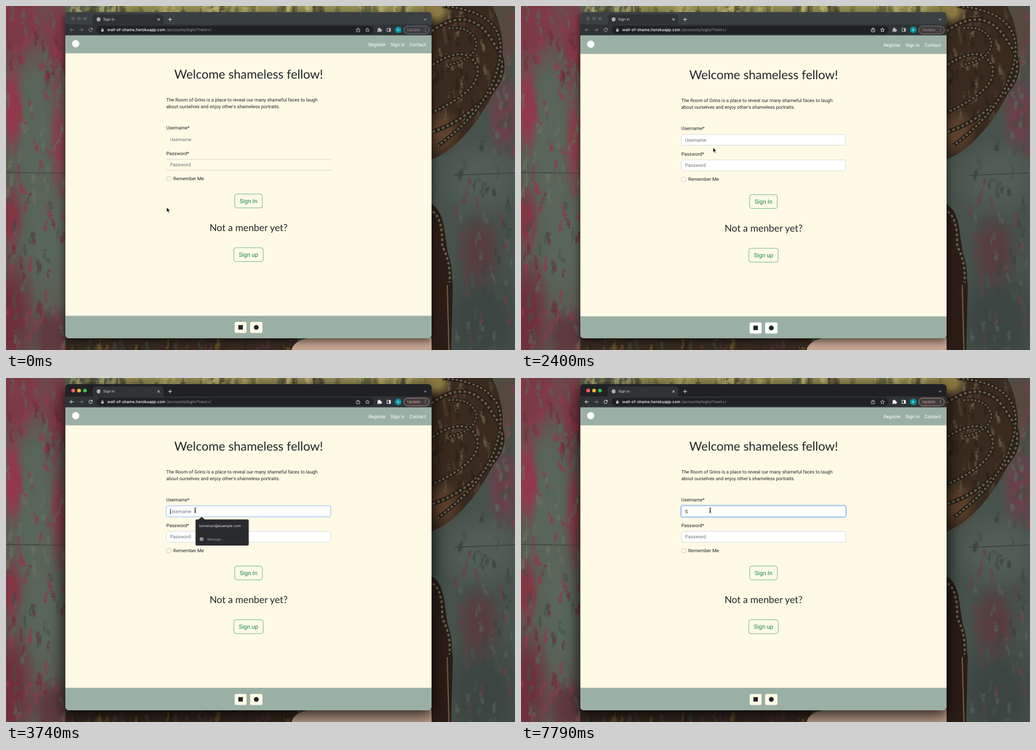
Write an HTML page with a canvas that moves like this. It is 909x616 px and loops after 8000 ms.

```html
<!DOCTYPE html>
<html lang="en">
<head>
<meta charset="utf-8">
<title>Sign in</title>
<style>
html, body { margin: 0; width: 100%; height: 100%; overflow: hidden; background: #4a534b; }
#wall, svg { position: absolute; left: 0; top: 0; }
#shade { position: absolute; left: 106px; top: 11px; width: 654px; height: 584px; border-radius: 6px; }
text { font: 8.41px Roboto, sans-serif; fill: #212529; text-rendering: geometricPrecision; white-space: pre; }
.title { font-family: Lato, sans-serif; text-anchor: middle; }
.btn { font-size: 10.52px; fill: #198754; text-anchor: middle; }
.nav { fill: #fff; }
.hint { fill: #6c757d; }
.ui { font-family: Inter, sans-serif; font-size: 6.4px; fill: #e8eaed; }
.line { fill: none; stroke-linecap: round; stroke-linejoin: round; }
</style>
</head>
<body>
<canvas id="wall" width="909" height="616"></canvas>
<div id="shade"></div>
<svg width="909" height="616" viewBox="0 0 909 616">
  <clipPath id="frame"><rect x="106" y="11" width="654" height="584" rx="6"/></clipPath>
  <g clip-path="url(#frame)">
    <rect id="strip" x="106" y="11" width="654" height="42"/>
    <path d="M151 34q4 0 4-4V20q0-5 5-5H276q5 0 5 5V30q0 4 4 4Z" fill="#2f3335"/>
    <rect x="106" y="33" width="654" height="20" fill="#2f3335"/>
    <rect x="162" y="35.5" width="494" height="14.5" rx="7.2" fill="#202124"/>
    <g id="lights"><circle cx="120" cy="22.5" r="3.3"/><circle cx="130.5" cy="22.5" r="3.3"/><circle cx="141" cy="22.5" r="3.3"/></g>

    <circle cx="165.5" cy="24" r="3.4" fill="#dadce0"/>
    <path class="line" d="M163 22.6l2 .6l.4 1.6l-1.4 1M166.5 21.4l.3 1.4l1.5.4M166.6 26.6l.5-1.6l1.4-.2" stroke="#45484c" stroke-width=".8"/>
    <text class="ui" x="173.8" y="26.3" style="font-size:6.3px">Sign in</text>
    <path class="line" d="M270.7 22.4l3.6 3.6m0-3.6l-3.6 3.6M290 24.2h6m-3-3v6M746.6 23.2l2 2l2-2" stroke="#e8eaed"/>

    <path id="back" class="line" d="M120.5 42.7h-6m2.7-2.7l-2.7 2.7l2.7 2.7"/>
    <path class="line" d="M131.5 42.7h6m-2.7-2.7l2.7 2.7l-2.7 2.7" stroke="#85888c"/>
    <path id="reload" class="line" d="M153.6 40.8a3 3 0 1 0 .5 2.6M154.1 39.5v2h-2"/>
    <rect x="170" y="42" width="4.4" height="3.7" rx=".6" fill="#bdc1c6"/>
    <path class="line" d="M171 42v-1a1.2 1.2 0 0 1 2.4 0v1" stroke="#bdc1c6" stroke-width=".8"/>
    <text class="ui" x="180.8" y="45.4" style="font-size:7.05px"><tspan fill="#fff" font-weight="500">wall-of-shame.herokuapp.com</tspan><tspan x="286.8" fill="#9aa0a6">/accounts/login/?next=/</tspan></text>
    <g id="tools" class="line" stroke-width=".9">
      <path d="M627 41.5h-1.3v4.7h6v-4.7h-1.3M628.7 44v-4.7m-1.6 1.5l1.6-1.6l1.6 1.6"/>
      <path d="M645.5 39.3l1 2.4l2.5.2l-1.9 1.7l.6 2.5l-2.2-1.4l-2.2 1.4l.6-2.5l-1.9-1.7l2.5-.2Z"/>
    </g>
    <g id="apps">
      <path d="M663.3 40.5h2a1.3 1.3 0 1 1 2.5 0h2v2.1a1.3 1.3 0 1 1 0 2.4v1.6h-2.1a1.1 1.1 0 0 0-2.2 0h-2.2v-2a1.2 1.2 0 0 0 0-2.3Z"/>
      <path d="M680 39.5h7.2v6.6H680ZM681 40.5v4.6h3v-4.6Z" fill-rule="evenodd"/>
    </g>
    <circle cx="700.5" cy="42.7" r="5.8" fill="#0097a7"/>
    <text class="ui" x="700.5" y="44.8" text-anchor="middle" style="font-size:5.8px">B</text>
    <g id="update">
      <rect x="710.5" y="36" width="45.5" height="13.8" rx="6.9" fill="#3d3b3e" stroke="currentColor" stroke-width=".8"/>
      <text class="ui" x="716.4" y="45.2" style="font-size:6.85px;fill:currentColor">Update</text>
      <path class="line" d="M749 40.2v0m0 2.6v0m0 2.6v0" stroke="currentColor" stroke-width="1.5"/>
    </g>

    <rect x="106" y="52.5" width="654" height="32" fill="#9bb0a5"/>
    <g id="page">
      <rect x="106" y="53" width="654" height="31.6" fill="#9bb0a5"/>
      <rect x="106" y="84.6" width="654" height="471" fill="#fefae6"/>
      <rect x="106" y="554.7" width="654" height="42" fill="#9bb0a5"/>
      <circle cx="124.5" cy="67.5" r="6.5" fill="#fff"/>
      <text class="nav" x="647.4" y="72">Register</text>
      <text class="nav" x="686.7" y="72">Sign in</text>
      <text class="nav" x="720.5" y="72">Contact</text>
      <text class="title" x="433.4" y="130.3" style="font-size:22.05px">Welcome shameless fellow!</text>
      <text x="286.2" y="170.5">The Room of Grins is a place to reveal our many shameful faces to laugh</text>
      <text x="286.2" y="183.2">about ourselves and enjoy other's shameless portraits.</text>
      <text x="286.2" y="221">Username*</text>
      <text x="286.2" y="266.8">Password*</text>
      <path id="faint" class="line" d="M286.5 231v-1M286.5 246v1M579.5 231v-1M579.5 246v1M288 274.6H578.5l1 1M286.5 275.6l1.5-1M288 294.2H578.5l1-1M286.5 293.2l1.5 1" stroke="#cfd1cc" stroke-width=".8"/>
      <g id="fields" fill="#fff" stroke="#ced4da" stroke-width=".8">
        <rect id="ring" x="285.2" y="228" width="295.6" height="21.4" rx="4" fill="none" stroke="#0d6efd" stroke-opacity=".3" stroke-width="2.2"/>
        <rect id="user" x="286.4" y="229" width="293.4" height="19.4" rx="3"/>
        <rect x="286.4" y="274.6" width="293.4" height="19.4" rx="3"/>
      </g>
      <text id="name" class="hint" x="292.9" y="241.7">Username</text>
      <text class="hint" x="292.9" y="287.3">Password</text>
      <rect id="caret" y="234" width=".9" height="10" fill="#212529"/>
      <rect id="check" x="286.8" y="305.4" width="7.6" height="7.6" rx="2" stroke="#b4b7b6" stroke-width=".7"/>
      <text x="298.8" y="312.3">Remember Me</text>
      <g fill="none" stroke="#198754" stroke-width=".6">
        <rect x="408.4" y="336.8" width="49.4" height="24.8" rx="3.8"/>
        <rect x="406.9" y="432.9" width="52.4" height="24.8" rx="3.8"/>
      </g>
      <text class="btn" x="433.1" y="353">Sign In</text>
      <text class="btn" x="433.1" y="449.1">Sign up</text>
      <text class="title" x="433.2" y="402.8" style="font-size:17.3px">Not a menber yet?</text>
      <g id="tiles"><rect x="408.4" y="565.7" width="21.2" height="19.7" rx="2.6"/><rect x="436" y="565.7" width="22" height="19.7" rx="2.6"/></g>
      <rect x="415" y="571.4" width="8" height="8" fill="#212529"/>
      <circle cx="447" cy="575.5" r="4.3" fill="#212529"/>
    </g>

    <g id="menu">
      <path d="M340.5 253.3H344l5.5-4.6l5.5 4.6H431.5q2 0 2 2V298q0 2-2 2H340.5q-2 0-2-2V255.3q0-2 2-2Z" fill="#292a2d"/>
      <text class="ui" x="345" y="267.3">tomelvari@example.com</text>
      <circle cx="349.2" cy="288.6" r="3.5" fill="#8b8e92"/>
      <text class="ui" x="359.6" y="291" style="fill:#9aa0a6">Manage...</text>
    </g>
  </g>
  <path id="arrow" d="M0 0V8.6L2 6.8L3.4 10L4.8 9.4L3.4 6.3H6.1Z" stroke="#fff" stroke-width=".7"/>
  <path id="beam" class="line" d="M336.3 232.5q1.5 0 1.5 1.2v6.6q0 1.2-1.5 1.2M339.3 232.5q-1.5 0-1.5 1.2v6.6q0 1.2 1.5 1.2M336.8 238.3h2" stroke="#222" stroke-width=".9"/>
</svg>
<script>
const $ = id => document.getElementById(id);
const show = (id, on) => $(id).style.display = on ? '' : 'none';
const set = (id, key, value) => $(id).setAttribute(key, value);

// Wallpaper: flat shapes, soft tones and faint ragged paint
const c = $('wall').getContext('2d');
let seed = 7;
const rnd = () => (seed = seed * 16807 % 2147483647) / 2147483647;
function fill(color, d) {
  c.fillStyle = color;
  c.fill(new Path2D(d));
}
function glow(color, x, y, rx, ry) {
  const g = c.createRadialGradient(0, 0, 0, 0, 0, 1);
  g.addColorStop(.35, color);
  g.addColorStop(1, color + '00');
  c.save();
  c.translate(x, y);
  c.scale(rx, ry);
  c.fillStyle = g;
  c.fillRect(-1, -1, 2, 2);
  c.restore();
}
function patches(n, x, y, w, h, colors, size = 6) {
  c.globalAlpha = .5;
  for (let i = 0; i < n; i++) {
    c.fillStyle = colors[i % colors.length];
    let px = x + rnd() * w, py = y + rnd() * h;
    for (let j = 0; j < 6; j++) {
      c.fillRect(px, py, 1 + rnd() * size, 1 + rnd() * size * 2);
      px += (rnd() - .5) * size;
      py += rnd() * size;
    }
  }
  c.globalAlpha = 1;
}
function braid(d, width) {
  const p = new Path2D(d);
  c.lineWidth = width;
  c.setLineDash([]);
  c.strokeStyle = '#291d15';
  c.stroke(p);
  c.lineWidth = width * .5;
  c.setLineDash([width * .6, width * .5]);
  c.strokeStyle = '#5f604f';
  c.stroke(p);
}
const green = '#59675a', teal = '#46524b', rose = '#91394a', wine = '#6f303b', brown = '#382a1f';

fill('#5a5c52', 'M0 0H110V616H0Z');
glow('#7c3a45', 20, 30, 75, 110);
glow('#7c3a45', 95, 60, 35, 110);
glow(green, 50, 230, 45, 190);
glow(rose, 12, 185, 22, 95);
glow('#85404a', 95, 240, 18, 110);
glow('#823742', 8, 380, 26, 70);
glow(green, 70, 420, 45, 120);
glow(wine, 8, 560, 50, 130);
glow('#5e3a3f', 85, 590, 50, 60);
patches(45, 0, 0, 106, 140, [rose, green, wine]);
patches(55, 0, 130, 106, 200, [green, rose, '#69705f']);
patches(60, 0, 330, 106, 286, [wine, green, rose, teal]);
fill('#3c403a', 'M0 297.5L106 299V300L0 299Z');

fill('#5a6050', 'M106 0H200V12H106Z');
fill('#958d56', 'M200 0H765V12H200Z');
patches(90, 110, -12, 650, 14, ['#cbbf7b', '#666843', '#91854d', '#4d4632', '#b6ab6d'], 8);
fill('#372a20', 'M106 594H520V616H106Z');
patches(35, 106, 594, 400, 16, ['#513439', '#6c5928', '#29251e', '#43483c']);
fill('#c7a692', 'M510 616Q514 598 545 594H766V616H510Z');

fill(teal, 'M760 0H909V616H760Z');
glow('#56493f', 900, 40, 45, 90);
glow('#69404a', 890, 195, 36, 90);
glow('#515e55', 850, 310, 85, 75);
glow('#3b4541', 850, 570, 90, 120);
glow('#583d3f', 845, 440, 45, 80);
patches(60, 800, 240, 109, 370, ['#69404a', '#3b4541', '#556158', '#46524b']);
patches(30, 870, 0, 40, 250, ['#74404a', '#4a4d43', green]);
fill(brown, 'M760 0H868Q905 70 868 160Q820 250 760 275Z');
glow('#8d7b43', 766, 8, 32, 28);
glow('#5c412d', 780, 225, 35, 45);
patches(70, 762, 0, 105, 195, ['#544434', '#2b2018', '#6b604b', '#45372a'], 5);
braid('M760 45Q830 -5 870 65Q910 120 850 170Q810 210 762 225', 8);
braid('M780 0Q890 10 883 85Q873 175 772 250', 7);
braid('M762 105Q825 65 842 110Q850 150 762 190', 7);
braid('M790 40Q830 35 840 65Q840 95 790 105', 6);
fill('#3c403a', 'M800 302.5L909 298V299.5L800 304Z');
fill('#2b1d16', 'M760 355Q780 365 784 410L798 500L795 616H760Z');
braid('M762 368Q780 380 779 430Q795 460 792 495', 8);
fill('#7a5d45', 'M789 500L792 616H790L787 500Z');

// Pointer stops: time, x, y
const path = [[0, 287, 360.5], [150, 277, 405], [300, 220, 500], [450, 181, 549], [600, 181, 549],
  [900, 207, 523], [1350, 275, 418], [1650, 293.5, 384], [1800, 293.5, 373], [2100, 293.5, 373],
  [2250, 324, 302], [2400, 343, 253.5], [2550, 347, 239], [3000, 348.5, 236.5]];
const blinks = [3740, 4190, 4790, 5240, 5690, 6290, 6740, 7190, 7340, 7790];

function movePointer(t) {
  const q = Math.min(3000, Math.floor(t / 150) * 150);
  const i = Math.max(1, path.findIndex(p => p[0] >= q));
  const [a, b] = [path[i - 1], path[i]];
  const k = (q - a[0]) / (b[0] - a[0]);
  const at = n => a[n] + (b[n] - a[n]) * k;
  set('arrow', 'transform', `translate(${at(1)} ${at(2)})`);
}

function draw(now) {
  const t = now % 8000;
  const active = t >= 2700, focus = t >= 3740, typed = t >= 7340;
  const bright = t >= 150 && !active;
  const tone = active ? '#f1f3f4' : '#85888c';

  set('strip', 'fill', active ? '#202124' : '#3a4042');
  $('shade').style.boxShadow = active ? '0 9px 26px 3px #000b' : '0 5px 14px 1px #0008';
  [...$('lights').children].forEach((dot, i) =>
    dot.setAttribute('fill', active ? ['#ff5f57', '#febc2e', '#28c840'][i] : '#56595c'));
  set('back', 'stroke', tone);
  set('reload', 'stroke', active ? tone : '#a0a3a6');
  set('tools', 'stroke', bright ? '#e8eaed' : '#bdc1c6');
  set('apps', 'fill', active ? '#f1f3f4' : '#b4b7ba');
  $('update').style.color = active ? '#eb9c94' : bright ? '#b18a89' : '#8b8d8e';

  const shift = t < 2100 || t >= 2700 ? 0 : t < 2250 ? .5 : t < 2400 ? .75 : 1;
  set('page', 'transform', `translate(0 ${shift})`);
  show('fields', bright || focus);
  show('faint', !bright && !focus);
  set('tiles', 'fill', bright ? '#fff' : '#fefae6');
  set('check', 'fill', bright ? '#fff' : '#fefae6');
  set('ring', 'opacity', !focus ? 0 : t < 3890 ? .2 : 1);
  set('user', 'stroke', focus ? '#86b7fe' : '#ced4da');

  $('name').textContent = typed ? 'S' : 'Username';
  set('name', 'class', typed ? '' : 'hint');
  show('caret', blinks.filter(b => b <= t).length % 2);
  set('caret', 'x', typed ? 297.9 : 293);
  show('menu', focus && !typed);

  movePointer(t);
  show('arrow', t < 3590);
  show('beam', t >= 3590);
  requestAnimationFrame(draw);
}
requestAnimationFrame(draw);
</script>
</body>
</html>
```
